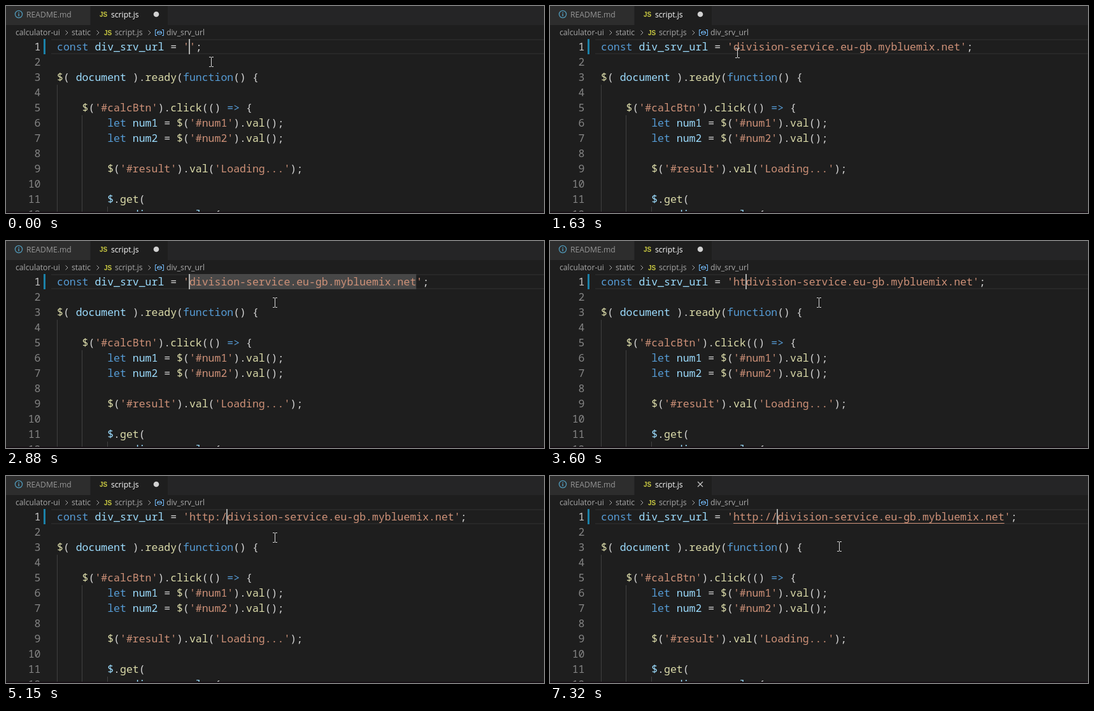
These frames come from a looping animation (845x326 px, 7550 ms). An HTML page with a canvas:

```html
<!DOCTYPE html>
<html lang="en">
<head>
<meta charset="utf-8">
<title>Code editor</title>
<style>
  html, body { margin: 0; width: 100%; height: 100%; overflow: hidden; background: #1e1e1e; }
  canvas { display: block; }
</style>
</head>
<body>
<canvas id="stage" width="845" height="326"></canvas>
<script>
const ctx = document.getElementById('stage').getContext('2d');
const LOOP = 7550;
const CHAR = 9.9, LEFT = 80, TOP = 52, ROW = 24;
const MONO = '16.5px "Noto Sans Mono", "DejaVu Sans Mono", monospace';
const UI = '12.2px "Open Sans", "Noto Sans", sans-serif';
const ICON = 'bold 10px "Liberation Sans", sans-serif';

const COLORS = { k: '#569cd6', v: '#9cdcfe', f: '#dcdcaa', s: '#ce9178', p: '#d4d4d4' };
const HOST = 'division-service.eu-gb.mybluemix.net';
const URL_COL = 21;

const valueLine = n => [
  8, 'k:let', 'p: ', 'v:num' + n, 'p: = ', 'f:$', 'p:(', `s:'#num${n}'`, 'p:).', 'f:val', 'p:();'
];

// Each row: indent, then "kind:text" tokens
const ROWS = {
  3: [0, 'f:$', 'p:( ', 'v:document', 'p: ).', 'f:ready', 'p:(', 'k:function', 'p:() {'],
  5: [4, 'f:$', 'p:(', "s:'#calcBtn'", 'p:).', 'f:click', 'p:(() ', 'k:=>', 'p: {'],
  6: valueLine(1),
  7: valueLine(2),
  9: [8, 'f:$', 'p:(', "s:'#result'", 'p:).', 'f:val', 'p:(', "s:'Loading...'", 'p:);'],
  11: [8, 'v:$', 'p:.', 'f:get', 'p:('],
  12: [12, 'v:div_srv_url', 'p:, {']
};

// Step tracks: [start time, value...]
const TYPED = [[0, ''], [1030, HOST], [3200, 'h' + HOST], [3600, 'ht' + HOST], [3750, 'htt' + HOST],
  [3900, 'http' + HOST], [4300, 'http:' + HOST], [5150, 'http:/' + HOST], [5380, 'http://' + HOST]];
const CARET_COL = [[0, 0], [1030, 36], [1870, 0], [3200, 1], [3600, 2], [3750, 3],
  [3900, 4], [4300, 5], [5150, 6], [5380, 7]];
const CARET_ON = [[0, true], [230, false], [1030, true], [1620, false], [1870, true], [2340, false],
  [2880, true], [4830, false], [5150, true], [5850, false], [6310, true], [6860, false], [7320, true]];
const POINTER = [[0, 322, 88], [80, 331, 91], [1160, 326, 87], [1240, 315, 82], [1320, 306, 80],
  [1470, 302, 78], [1550, 298, 76], [1620, 294, 74], [1700, 291, 72], [1870, 284, 69], [1950, 280, 70],
  [2020, 345, 85], [2100, 420, 96], [2340, 421, 96], [2410, 422, 97],
  [6860, 428, 100], [6940, 440, 106], [7010, 450, 110], [7090, 454, 111]];

const stepAt = (track, t) => track.findLast(step => step[0] <= t);
const colX = col => LEFT + col * CHAR;
const rowY = row => TOP + (row - 1) * ROW;

function rect(x, y, w, h, color) {
  ctx.fillStyle = color;
  ctx.fillRect(x, y, w, h);
}

function text(str, x, y, font, color) {
  ctx.font = font;
  ctx.fillStyle = color;
  ctx.fillText(str, x, y);
}

function stroke(points, color, width = 1) {
  ctx.strokeStyle = color;
  ctx.lineWidth = width;
  ctx.beginPath();
  points.forEach(([x, y], i) => i ? ctx.lineTo(x, y) : ctx.moveTo(x, y));
  ctx.stroke();
}

function disc(x, y, r, color) {
  ctx.fillStyle = color;
  ctx.beginPath();
  ctx.arc(x, y, r, 0, Math.PI * 2);
  ctx.fill();
}

function drawTabs(saved) {
  rect(0, 0, 845, 30, '#252526');
  rect(0, 0, 132, 30, '#2d2d2d');
  rect(133, 0, 121, 30, '#1e1e1e');

  ctx.strokeStyle = '#519aba';
  ctx.lineWidth = 1.3;
  ctx.beginPath();
  ctx.arc(20, 13, 5.6, 0, Math.PI * 2);
  ctx.stroke();
  rect(19.3, 9.8, 1.5, 1.5, '#519aba');
  rect(19.3, 12.2, 1.5, 4, '#519aba');

  text('README.md', 32, 17.5, UI, '#969696');
  text('JS', 147, 17, ICON, '#cbcb41');
  text('script.js', 165, 17.5, UI, '#ffffff');
  if (saved) {
    stroke([[232, 9], [240, 17]], '#c5c5c5', 1.2);
    stroke([[240, 9], [232, 17]], '#c5c5c5', 1.2);
  } else {
    disc(236, 13, 4.3, '#d0d0d0');
  }
}

function drawBreadcrumbs() {
  const gray = '#a9a9a9', blue = '#75beff';
  text('calculator-ui', 15, 46, UI, gray);
  text('static', 103, 46, UI, gray);
  text('JS', 154, 45.5, ICON, '#cbcb41');
  text('script.js', 171, 46, UI, gray);
  text('div_srv_url', 252, 46, UI, gray);
  for (const x of [93.5, 142.5, 223.5]) stroke([[x, 38.5], [x + 3.5, 42], [x, 45.5]], gray);

  stroke([[237, 37.5], [234.5, 37.5], [234.5, 46.5], [237, 46.5]], blue);
  stroke([[245, 37.5], [247.5, 37.5], [247.5, 46.5], [245, 46.5]], blue);
  stroke([[237.5, 41], [241.5, 39.5], [244.5, 41], [244.5, 43.5], [240.5, 45], [237.5, 43.5],
    [237.5, 41], [240.5, 42.3], [244.5, 41]], blue);
}

function drawRow(row, [indent, ...tokens]) {
  let col = indent;
  for (const token of tokens) {
    const str = token.slice(2);
    text(str, colX(col), rowY(row) + 18, MONO, COLORS[token[0]]);
    col += str.length;
  }
}

function drawEditor(t) {
  const url = stepAt(TYPED, t)[1];
  const urlX = colX(URL_COL);

  rect(71, 52, 774, 2, '#282828');
  rect(71, 74, 774, 2, '#282828');
  rect(59, 52, 3, ROW, '#1b81a8');
  if (t >= 2170 && t < 3200) rect(urlX, TOP, url.length * CHAR, ROW, '#474747');

  rect(80, 124, 1, 202, '#404040');
  rect(119, 172, 1, 154, '#404040');
  rect(159, 316, 1, 10, '#404040');

  ctx.textAlign = 'right';
  for (let n = 1; n <= 12; n++) {
    text(n, 54.5, rowY(n) + 18, MONO, n === 1 ? '#c6c6c6' : '#858585');
  }
  ctx.textAlign = 'left';

  drawRow(1, [0, 'k:const', 'p: ', 'v:div_srv_url', 'p: = ', `s:'${url}'`, 'p:;']);
  for (const row in ROWS) drawRow(row, ROWS[row]);

  if (t >= 6310) rect(urlX, 74, url.length * CHAR, 1, COLORS.s);
  if (stepAt(CARET_ON, t)[1]) {
    const x = Math.floor(colX(URL_COL + stepAt(CARET_COL, t)[1]) - 0.5);
    rect(x, TOP, 2, ROW, '#aeafad');
  }
}

function drawPointer(x, y) {
  const color = '#d8d8d8';
  rect(x, y - 7, 1, 14, color);
  for (const edge of [y - 8, y + 7]) {
    rect(x - 3, edge, 3, 1, color);
    rect(x + 1, edge, 3, 1, color);
  }
}

function draw(t) {
  rect(0, 0, 845, 326, '#1e1e1e');
  drawTabs(t >= 6940);
  drawBreadcrumbs();
  drawEditor(t);
  rect(0, 324, 845, 2, '#150e14');
  const [, x, y] = stepAt(POINTER, t);
  drawPointer(x, y);
}

const start = performance.now();
function tick() {
  draw((performance.now() - start) % LOOP);
  requestAnimationFrame(tick);
}
tick();
</script>
</body>
</html>
```
